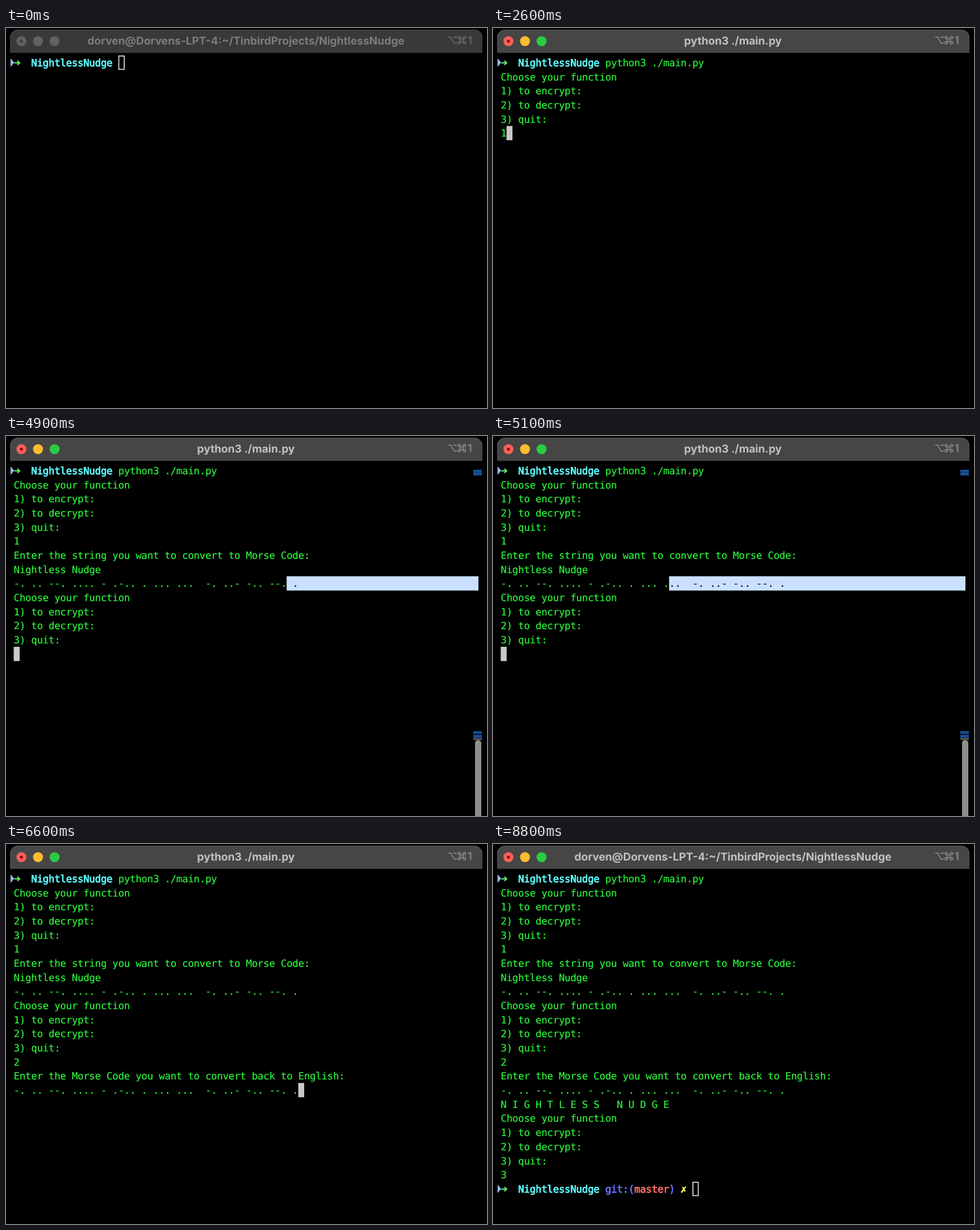
An HTML page for the animation above (9.21 s loop, 842x665 px).

```html
<!DOCTYPE html>
<html lang="en">
<head>
<meta charset="utf-8">
<title>Terminal session</title>
<style>
html, body { margin: 0; width: 100%; height: 100%; overflow: hidden; background: #000; }
svg { display: block; width: 842px; height: 665px; --bar: #464646; --title: #c1c1c1; --hint: #828282;
  --red: #fe5f57; --yellow: #fdbd2e; --green: #2bcb43; --dot: #7c0b06; }
svg.idle { --bar: #393939; --title: #7c7c7c; --hint: #646464;
  --red: #616161; --yellow: #616161; --green: #616161; --dot: #3a3a3a; }
text { white-space: pre; text-rendering: geometricPrecision; }
.ui { font: 700 19px Inter, sans-serif; }
.hint { font-weight: 600; }
#term { font: 17.44px "DejaVu Sans Mono", monospace; letter-spacing: -.335px; }
#term text { fill: var(--ink, #2cfb3d); stroke: var(--ink, #2cfb3d); stroke-width: .15; }
#term .bold { stroke-width: .8; }
.glyph { fill: none; stroke: var(--hint); stroke-width: 1.9; }
.mark { fill: #174f94; }
</style>
</head>
<body>
<svg id="stage" viewBox="0 0 842 665">
  <rect width="842" height="665"/>
  <path d="M7 44V17a14 14 0 0 1 14-14H820a14 14 0 0 1 14 14V44Z" fill="var(--bar)"/>
  <path d="M7.5 17a13.5 13.5 0 0 1 13.5-13.5H820a13.5 13.5 0 0 1 13.5 13.5" fill="none" stroke="#666" stroke-opacity=".6"/>
  <rect x="7" y="43" width="827" height="1" fill="#000" fill-opacity=".4"/>
  <circle cx="27" cy="23" r="8.7" fill="var(--red)"/>
  <circle cx="27" cy="23" r="2.6" fill="var(--dot)"/>
  <circle cx="56" cy="23" r="8.7" fill="var(--yellow)"/>
  <circle cx="85" cy="23" r="8.7" fill="var(--green)"/>
  <text id="title" class="ui" x="420" y="29" text-anchor="middle" fill="var(--title)"></text>
  <path class="glyph" d="M774 16h4.5l6 10.5h5M783.5 16h6"/>
  <path class="glyph" transform="translate(798 21.2)" d="M-2.6-2.6H-4.6a2 2 0 1 1 2-2V4.6a2 2 0 1 1-2-2H4.6a2 2 0 1 1-2 2V-4.6a2 2 0 1 1 2 2H-2.6"/>
  <text class="ui hint" x="808" y="28" fill="var(--hint)">1</text>

  <g id="term"></g>
  <rect id="block" fill="#c9c9c9" width="10.4" height="25"/>
  <rect id="hollow" fill="none" stroke="#d2d2d2" stroke-width="1.8" width="9.4" height="23.4"/>

  <g id="scroll">
    <rect class="mark" x="818" y="59" width="15" height="4.7"/>
    <rect class="mark" x="818" y="64" width="15" height="5"/>
    <rect class="mark" x="818" y="516.5" width="15" height="5"/>
    <rect class="mark" x="818" y="523" width="15" height="5"/>
    <rect x="818" y="528.5" width="15" height="3.5" fill="#555"/>
    <path d="M821 665V537.5a5.5 5.5 0 0 1 11 0V665Z" fill="#8e8e8e"/>
  </g>
</svg>
<script>
const LOOP = 9210, LEFT = 13.5, TOP = 48, CELL = 10.165, LINE = 24.68;
const project = 'NightlessNudge', phrase = 'Nightless Nudge';
const code = '-. .. --. .... - .-.. . ... ...  -. ..- -.. --. .';
const shellTitle = 'dorven@Dorvens-LPT-4:~/TinbirdProjects/' + project;

const $ = id => document.getElementById(id);
const term = $('term');
const colX = c => LEFT + c * CELL;
const rowY = r => TOP + r * LINE;
const show = (el, on) => el.setAttribute('visibility', on ? 'visible' : 'hidden');

function make(tag, attrs, parent = term) {
  const el = document.createElementNS('http://www.w3.org/2000/svg', tag);
  for (const k in attrs) el.setAttribute(k, attrs[k]);
  return parent.appendChild(el);
}
function label(row, col, str, attrs = {}, parent = term) {
  const el = make('text', { x: colX(col), y: rowY(row) + 18.9, ...attrs }, parent);
  el.textContent = str;
  return el;
}

// Output that appears at once
const printed = [];
const print = (at, row, str) => printed.push({ at, el: label(row, 0, str) });

function menu(at, row) {
  ['Choose your function', '1) to encrypt:', '2) to decrypt:', '3) quit:']
    .forEach((str, i) => print(at, row + i, str));
}
function prompt(at, row, git) {
  const el = make('g', {}), y = rowY(row);
  const bold = (col, str, ink) => label(row, col, str, { class: 'bold', style: `--ink: ${ink}` }, el);
  make('path', { d: `M8 ${y + 5}l6.3 7.5-6.3 7.5z`, fill: '#8fbcf5' }, el);
  make('path', { d: `M14.5 ${y + 13}h8.5M20 ${y + 9.3}l3.8 3.7-3.8 3.7`, fill: 'none', stroke: '#5ffa68', 'stroke-width': 2.1 }, el);
  bold(3, project, '#60fdff');
  if (git) {
    bold(18, 'git:(', '#6871ff');
    bold(23, 'master', '#ff6e67');
    bold(29, ')', '#6871ff');
    bold(31, '✗', '#fefb67');
  }
  printed.push({ at, el });
}

prompt(0, 0, false);
menu(2100, 1);
print(3000, 6, 'Enter the string you want to convert to Morse Code:');
print(4300, 8, code);
menu(4300, 9);
print(6400, 14, 'Enter the Morse Code you want to convert back to English:');
print(6800, 16, [...phrase.toUpperCase()].join(' '));
menu(6800, 17);
prompt(7500, 22, true);

// Typed input: steps are [time, characters so far]
const typed = [
  [0, 18, 'python3 ./main.py', [[600, 1], [700, 2], [800, 3], [900, 5], [1000, 6], [1100, 8],
    [1300, 10], [1400, 12], [1500, 14], [1700, 15], [1800, 17]]],
  [5, 0, '1', [[2600, 1]]],
  [7, 0, phrase, Array.from({ length: 8 }, (_, i) => [3300 + i * 100, Math.round((i + 1) * 15 / 8)])],
  [13, 0, '2', [[6200, 1]]],
  [15, 0, code, [[6600, code.length]]],
  [21, 0, '3', [[7200, 1]]]
].map(([row, col, str, steps]) => ({ row, str, steps, el: label(row, col, '') }));

// Cursor home positions: time, row, column
const homes = [[0, 0, 18], [2000, 1, 0], [2100, 5, 0], [3000, 7, 0], [4300, 13, 0],
  [6400, 15, 0], [6800, 21, 0], [7400, 22, 0], [7500, 22, 33]];

// Selection start column while dragging leftwards
const drag = [[4900, 47], [5000, 40], [5100, 29], [5200, 15], [5300, 4], [5400, 0]];
const selection = make('g', {});
const selBox = make('rect', { y: rowY(8), height: 25, fill: '#c9e1ff' }, selection);
const selText = label(8, 0, '', { style: '--ink: #0a0f18' }, selection);

const latest = (list, t) => list.filter(s => s[0] <= t).pop();

function draw(t) {
  $('stage').classList.toggle('idle', t < 300);
  $('title').textContent = t >= 2000 && t < 7500 ? 'python3 ./main.py' : shellTitle;
  for (const p of printed) show(p.el, t >= p.at);

  let [, row, col] = latest(homes, t);
  for (const k of typed) {
    const step = latest(k.steps, t), n = step ? step[1] : 0;
    k.el.textContent = k.str.slice(0, n);
    if (k.row === row) col += n;
  }
  const hollow = t < 300 || t >= 8700, inset = hollow ? 1 : 0;
  show($('hollow'), hollow);
  show($('block'), !hollow);
  const cursor = $(hollow ? 'hollow' : 'block');
  cursor.setAttribute('x', colX(col) + inset);
  cursor.setAttribute('y', rowY(row) + inset);

  const selecting = t >= 4900 && t < 5900;
  show(selection, selecting);
  if (selecting) {
    const from = latest(drag, t)[1], end = t < 5400 ? 827 : colX(50);
    selBox.setAttribute('x', colX(from));
    selBox.setAttribute('width', end - colX(from));
    selText.setAttribute('x', colX(from));
    selText.textContent = code.slice(from);
  }
  $('scroll').setAttribute('opacity', t < 4900 || t >= 5400 ? 0 : t < 5300 ? 1 : .5);
}

const start = performance.now();
function tick() {
  draw((performance.now() - start) % LOOP);
  requestAnimationFrame(tick);
}
tick();
</script>
</body>
</html>
```
